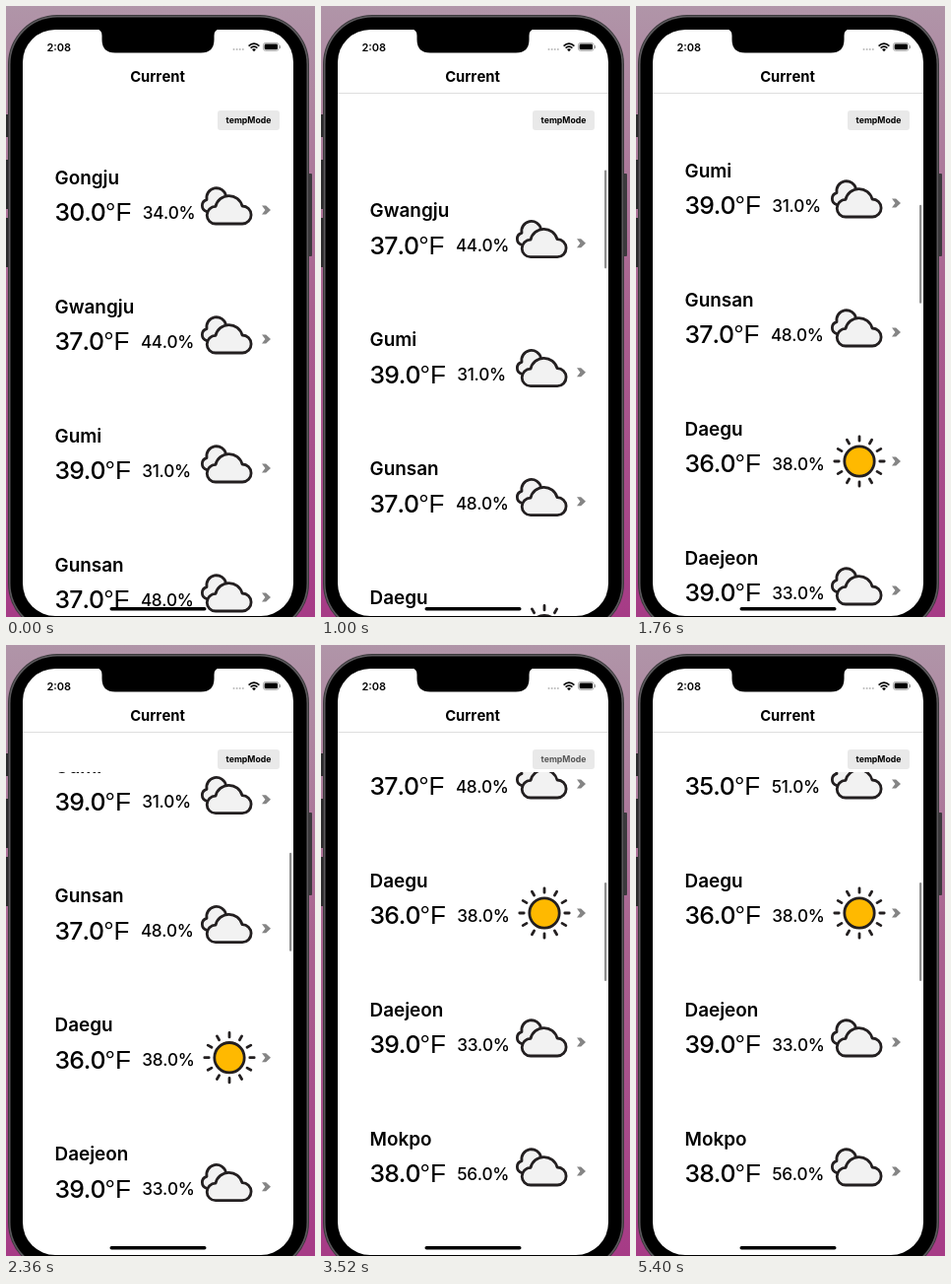
Write an HTML page with a canvas that moves like this. It is 314 px wide and 620 px high and loops after 6.36 s.

```html
<!DOCTYPE html>
<html lang="en">
<head>
<meta charset="utf-8">
<title>Current weather</title>
<style>
  html, body { margin: 0; width: 100%; height: 100%; overflow: hidden; }
  canvas { display: block; }
</style>
</head>
<body>
<canvas id="stage" width="314" height="620"></canvas>
<script>
const ctx = document.getElementById('stage').getContext('2d');
const LOOP = 6360, TICK = 40, ROW_HEIGHT = 131;
const INK = '#231f20', CLOUD = '#f2f2f2';

const cities = [
  ['Gongju', 30, 34], ['Gwangju', 37, 44], ['Gumi', 39, 31], ['Gunsan', 37, 48],
  ['Daegu', 36, 38, true], ['Daejeon', 39, 33], ['Mokpo', 38, 56]
].map(([name, temp, humidity, sunny]) => ({ name, temp, humidity, sunny }));
const refreshedGunsan = { temp: 35, humidity: 51 };

// Each drag: start time, end time, start offset, end offset, easing
const smooth = p => p * p * (3 - 2 * p);
const easeOut = p => 1 - (1 - p) ** 2;
const drags = [
  [160, 480, 0, 62, smooth],
  [840, 1240, 62, 168, p => p ** 1.2],
  [1240, 1480, 168, 243, easeOut],
  [1520, 1760, 243, 269, smooth],
  [2240, 2600, 269, 436, smooth],
  [2600, 2800, 436, 459, easeOut]
];
const clamp = v => Math.min(1, Math.max(0, v));

function scrollAt(t) {
  return drags.reduce((y, [t0, t1, from, to, ease]) =>
    t > t0 ? from + (to - from) * ease(clamp((t - t0) / (t1 - t0))) : y, 0);
}

// The unit button reloads the rows; they stay empty until their data arrives.
function readingAt(index, t) {
  const delay = Math.max(0, index - 4) * TICK;
  const city = cities[index];
  if (t < 3600) return { ...city, unit: 'F' };
  if (t < 3960 + delay || (t >= 4880 && t < 5320 + delay)) return null;
  const fresh = index === 3 ? { ...city, ...refreshedGunsan } : city;
  if (t >= 4880) return { ...fresh, unit: 'F' };
  return { ...fresh, temp: Math.round((fresh.temp - 32) * 5 / 9), unit: 'C' };
}

function box(x, y, w, h, r, fill) {
  ctx.fillStyle = fill;
  ctx.beginPath();
  ctx.roundRect(x, y, w, h, r);
  ctx.fill();
}

// Draws text on its baseline and returns the x where it ends.
function label(text, x, y, font, color = '#000', spacing = 0) {
  ctx.font = font;
  ctx.letterSpacing = spacing + 'px';
  ctx.fillStyle = color;
  ctx.fillText(text, x, y);
  return x + ctx.measureText(text).width;
}

function shape(d, fill, stroke) {
  const path = new Path2D(d);
  if (fill) { ctx.fillStyle = fill; ctx.fill(path); }
  if (stroke) { ctx.strokeStyle = stroke; ctx.stroke(path); }
}

function drawBackdrop() {
  const gradient = ctx.createLinearGradient(0, 0, 0, 620);
  gradient.addColorStop(0, '#b095a8');
  gradient.addColorStop(0.5, '#a9618f');
  gradient.addColorStop(1, '#a63b86');
  ctx.fillStyle = gradient;
  ctx.fillRect(0, 0, 314, 620);
}

function drawPhone() {
  for (const [y, h] of [[110, 23], [156, 50], [215, 50]]) box(-2, y, 5, h, 1, '#2b2a2c');
  box(306, 170, 5, 84, 1, '#3b393c');
  box(2, 9, 306, 627, 50, '#39373a');
  box(3, 10, 304, 625, 49, '#5b595c');
  box(4.5, 11.5, 301, 622, 47.5, '#000');
  box(17, 24, 275, 595, 33, '#fff');
  shape('M92 23.5H217Q211.5 24 211.5 30V34Q211.5 47.5 198 47.5H111Q97.5 47.5 97.5 34V30Q97.5 24 92 23.5Z', '#000');
}

function drawStatusBar() {
  label('2:08', 41.5, 45.5, '600 11px Inter, sans-serif');
  for (let i = 0; i < 4; i++) box(230.5 + i * 3.1, 43, 2, 2, 1, '#bbb');
  ctx.lineWidth = 1.7;
  ctx.lineCap = 'butt';
  shape('M246.6 40.6Q252 35.8 257.4 40.6M248.6 42.7Q252 39.6 255.4 42.7', null, '#000');
  shape('M250 44.1Q252 42.6 254 44.1L252 46.2Z', '#000');
  ctx.lineWidth = 0.8;
  ctx.strokeStyle = '#999';
  ctx.beginPath();
  ctx.roundRect(261.4, 37.4, 15.8, 8, 2.4);
  ctx.stroke();
  box(262.6, 38.6, 13.4, 5.6, 1.3, '#000');
  box(277.8, 40, 1.2, 3, 0.6, '#999');
}

function drawCloud() {
  const rear = 'M204 34.6A6.2 6.2 0 0 1 204 22.6A9.8 9.8 0 0 1 223.5 18.8';
  ctx.lineWidth = 2.8;
  shape(rear + 'L213 36Z', CLOUD);
  shape(rear, null, INK);
  shape('M213 47A8.8 8.8 0 0 1 213 29.4A13.9 13.9 0 0 1 240 29A9 9 0 0 1 240.2 47Z', CLOUD, INK);
}

function drawSun() {
  ctx.lineWidth = 2.8;
  ctx.strokeStyle = INK;
  ctx.fillStyle = '#ffb900';
  ctx.beginPath();
  ctx.arc(227, 33, 15.2, 0, Math.PI * 2);
  ctx.fill();
  ctx.stroke();
  ctx.beginPath();
  for (let i = 0; i < 12; i++) {
    const a = i * Math.PI / 6, c = Math.cos(a), s = Math.sin(a);
    ctx.moveTo(227 + 20.8 * c, 33 + 20.8 * s);
    ctx.lineTo(227 + 25.2 * c, 33 + 25.2 * s);
  }
  ctx.stroke();
}

// Row coordinates are relative to the middle of the city name.
function drawRow(index, t) {
  label(cities[index].name, 49.5, 6.5, '600 18.9px Inter, sans-serif');
  shape('M260 28.5H264.2L269 33L264.2 37.5H260L263.4 33Z', '#858585');
  const reading = readingAt(index, t);
  if (!reading) return;
  let x = label(reading.temp.toFixed(1), 49.5, 44, '500 24.8px Inter, sans-serif', '#000', -0.9);
  x = label('°' + reading.unit, x, 44, '26px "Liberation Sans", Arial, sans-serif');
  label(reading.humidity.toFixed(1) + '%', x + 11.5, 41.7, '500 17.2px Inter, sans-serif', '#000', -0.4);
  reading.sunny ? drawSun() : drawCloud();
}

function drawList(t, scroll) {
  ctx.save();
  ctx.beginPath();
  ctx.roundRect(17, 24, 275, 595, 33);
  ctx.clip();
  ctx.beginPath();
  ctx.rect(17, 129, 275, 490);
  ctx.clip();
  ctx.lineCap = ctx.lineJoin = 'round';
  cities.forEach((_, i) => {
    const y = 174 + i * ROW_HEIGHT - scroll;
    if (y < 60 || y > 640) return;
    ctx.save();
    ctx.translate(0, y);
    drawRow(i, t);
    ctx.restore();
  });
  if (scroll > 0) box(288, 146.3 + scroll * 0.2065, 2.2, 100, 1.1, '#8e8e8e');
  ctx.restore();
}

function draw(t) {
  const scroll = scrollAt(t);
  const pressed = (t >= 3520 && t < 3600) || (t >= 4800 && t < 4880);
  drawBackdrop();
  drawPhone();
  drawStatusBar();
  ctx.textAlign = 'center';
  label('Current', 154, 77, '700 14.8px Inter, sans-serif');
  if (scroll > 0) box(17, 88, 275, 1, 0, '#dedede');
  box(215, 106, 63, 20, 3, '#e9e9e9');
  label('tempMode', 246.5, 119, '700 8.7px Inter, sans-serif', pressed ? '#555' : '#000');
  ctx.textAlign = 'left';
  drawList(t, scroll);
  box(105.5, 610, 98, 3.5, 1.75, '#000');
}

ctx.fontKerning = 'none';
const start = performance.now();
function frame() {
  const t = (performance.now() - start) % LOOP;
  draw(Math.floor(t / TICK) * TICK);
  requestAnimationFrame(frame);
}
frame();
</script>
</body>
</html>
```
